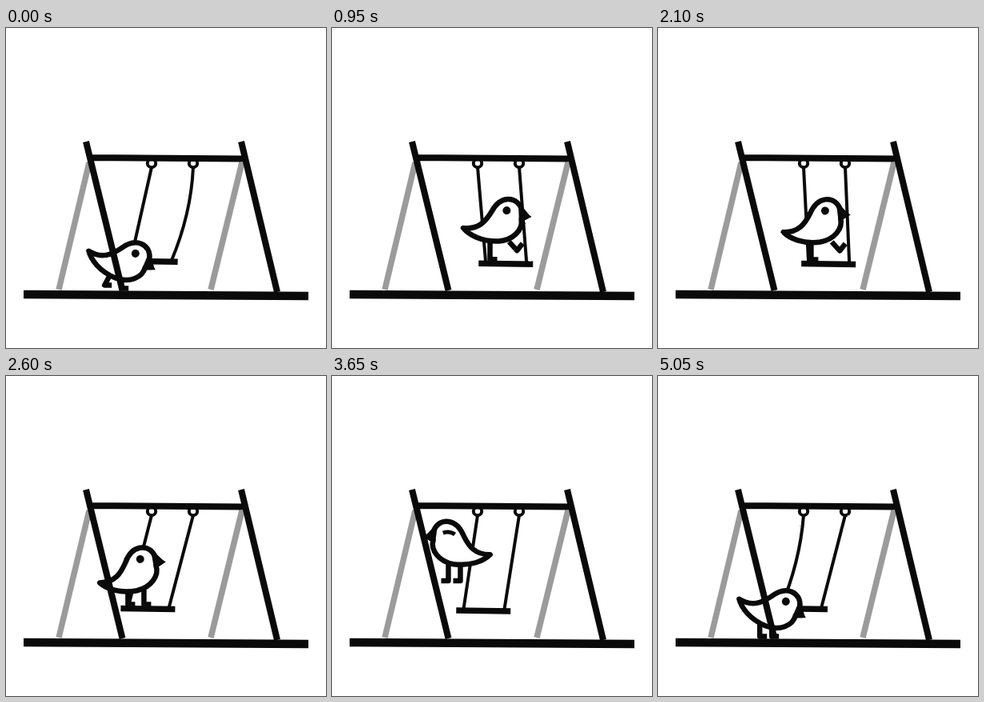
Recreate the animation shown at these times as an HTML page. Size 400 px wide and 400 px high, loop 5.1 s.

```html
<!DOCTYPE html>
<html lang="en">
<head>
<meta charset="utf-8">
<title>Bird on a swing</title>
<style>
  html, body { margin: 0; width: 100%; height: 100%; overflow: hidden; background: #fff; }
  svg { display: block; width: 100vw; height: 100vh; }
  .ink { stroke: #0a0a0a; fill: none; }
  .fill { fill: #0a0a0a; stroke: none; }
  .back { stroke: #9b9b9b; stroke-width: 7.5; }
</style>
</head>
<body>
<svg viewBox="0 0 400 400">
  <defs>
    <filter id="rough" filterUnits="userSpaceOnUse" x="0" y="0" width="400" height="400" color-interpolation-filters="sRGB">
      <feTurbulence id="grain" type="fractalNoise" baseFrequency="0.3" numOctaves="1" seed="1"/>
      <feDisplacementMap in="SourceGraphic" scale="1.6" xChannelSelector="R" yChannelSelector="G"/>
    </filter>
  </defs>
  <g filter="url(#rough)">
    <path class="back" d="M104 168L66 327M295 168L256 327"/>
    <path id="ropes" class="ink" stroke-width="4"/>
    <path id="seat" class="ink" stroke-width="7.5"/>
    <path id="legs" class="ink" stroke-width="6.5" stroke-linejoin="round"/>
    <g id="bird">
      <path class="ink" style="fill:#fff" stroke-width="6.5" stroke-linejoin="round"
        d="M-52-39C-33-36-24-46-16-58C-9-70-2-73 5-73C15-73 20-66 22-59L28-51L21-48C23-34 10-22-8-21C-30-21-45-30-52-39Z"/>
      <path class="fill" d="M18-63L34-50L18-43Z"/>
      <circle id="eye" class="fill" cx="3" cy="-59" r="5"/>
      <path id="lid" class="ink" stroke-width="5" d="M-5-58Q2-62 10-58"/>
    </g>
    <g class="ink">
      <circle cx="182" cy="169" r="5.2" stroke-width="4"/>
      <circle cx="234" cy="169" r="5.2" stroke-width="4"/>
      <path stroke-width="8" d="M104 162L298 163.5M100 142L145.5 328M294 142L339 330"/>
      <path stroke-width="10.5" d="M22 333L378 335"/>
    </g>
  </g>
</svg>
<script>
const LOOP = 5100, STEP = 50, ROPE = 122, GROUND = 335, TAU = 2 * Math.PI;
const RUN = 280, SIT = 450, CALM = 3130, LEAP = 3380, LAND = 3860, TURN = 4030, GRAB = 4450, READY = 5050;
const el = id => document.getElementById(id);
const rad = d => d * Math.PI / 180;
const mix = (a, b, u) => a + (b - a) * u;
const ramp = (t, a, b) => Math.max(0, Math.min(1, (t - a) / (b - a)));
const ease = u => (1 - Math.cos(Math.PI * u)) / 2;
const show = (id, on) => el(id).setAttribute('visibility', on ? 'visible' : 'hidden');

// the pumped ride: one swell of height, backswing a little quicker
function ride(t) {
  const height = 74 * Math.sin(Math.PI * ramp(t, RUN, CALM));
  const phase = TAU * (t - 935) / 1159;
  const angle = height * Math.sin(phase + 0.4 * (1 - Math.cos(phase)));
  return { height, angle, kick: height > 20 && Math.cos(phase) > 0 };
}

function swingAngle(t) {
  const pull = t < RUN ? 13.2 * (1 - ease(ramp(t, 0, RUN))) : 14.5 * ease(ramp(t, GRAB, READY));
  const recoil = 15 * (1 - ramp(t, CALM, GRAB)) * Math.sin(TAU * Math.max(0, t - CALM) / 690);
  return ride(t).angle + recoil - pull;
}

function drawSwing(t, angle) {
  const x = 208.5 + ROPE * Math.sin(rad(angle));
  const y = 172.5 + ROPE * Math.cos(rad(angle));
  const rope = (top, end, bow) =>
    `M${top} 174Q${(top + end) / 2 + bow} ${(174 + y) / 2} ${end} ${y}`;
  el('ropes').setAttribute('d',
    rope(182, x - 25, 10 * ramp(t, GRAB, READY)) +
    rope(234, x + 26, 11 * (1 - ramp(t, 0, RUN))));
  el('seat').setAttribute('d', `M${x - 34} ${y}L${x + 34} ${y + 1}`);
  return { x, y: y - 3 };
}

function hop(a, b, u, rise) {
  return {
    x: mix(a.x, b.x, u),
    y: mix(a.y, b.y, u) - rise * Math.sin(Math.PI * u),
    tilt: mix(a.tilt, b.tilt, u) - rise / 8 * Math.sin(Math.PI * u)
  };
}

function seated(t, angle, seat) {
  const { height, kick } = ride(t);
  return {
    x: seat.x + Math.min(0, angle) / 7.4,
    y: seat.y - (kick ? 4 : 0),
    tilt: -0.45 * Math.abs(angle) - height / 11 * ramp(t, 1000, 1700)
  };
}

function pose(t, angle, seat) {
  const spot = (x, tilt) => ({ x, y: GROUND, tilt });
  const sit = seated(t, angle, seat);
  const push = ramp(t, 0, RUN);
  if (t < SIT) return hop(spot(mix(136, 170, push), mix(23, 8, push)), sit, ramp(t, RUN, SIT), 22);
  if (t < LEAP) return sit;
  if (t < LAND) return hop({ x: 213, y: 291, tilt: 0 }, spot(85, 0), ramp(t, LEAP, LAND), 62);
  const go = ramp(t, TURN, GRAB), haul = ramp(t, GRAB, READY);
  return spot(mix(85, 180, go) - 46 * haul, 10 * go + 13 * haul);
}

function drawLegs(t, p, seat, face, kick) {
  const { x, y } = p, a = rad(p.tilt);
  const hx = -9 * Math.cos(a) + 23 * Math.sin(a);
  const hy = y - 9 * Math.sin(a) - 23 * Math.cos(a);
  const grounded = y > 330, onSeat = t >= SIT && t < LEAP;
  const floor = grounded ? 325.5 : onSeat ? seat.y - 2 : y + 1;
  const stride = grounded && (t < RUN || t > TURN) ? Math.cos(TAU * t / 200) : 0;
  const gap = onSeat ? 10 : 7.5;
  const px = v => x + face * v;
  const leg = (side, reach, lift) =>
    `M${px(hx + side)} ${hy}L${px(hx + side + reach)} ${floor - 4 * Math.max(0, lift)}h${face * 9}`;
  const kicked = `M${px(4)} ${y - 20}L${px(14)} ${y - 9}L${px(21)} ${y - 18}`;
  el('legs').setAttribute('d',
    leg(-gap, -6 * stride, stride) + (kick ? kicked : leg(gap, 0, -stride)));
}

function draw(t) {
  const angle = swingAngle(t);
  const seat = drawSwing(t, angle);
  const p = pose(t, angle, seat);
  const face = t >= 3300 && t < TURN ? -1 : 1;
  drawLegs(t, p, seat, face, t >= SIT && ride(t).kick);
  el('bird').setAttribute('transform',
    `translate(${p.x} ${p.y}) scale(${face} 1) rotate(${p.tilt})`);
  const blink = Math.abs(t - 3650) < 100;
  show('eye', !blink);
  show('lid', blink);
  el('grain').setAttribute('seed', 1 + (t / STEP) % 3);
}

const start = performance.now();
let last = -1;
function tick() {
  const t = Math.floor(((performance.now() - start) % LOOP) / STEP) * STEP;
  if (t !== last) draw(last = t);
  requestAnimationFrame(tick);
}
tick();
</script>
</body>
</html>
```
